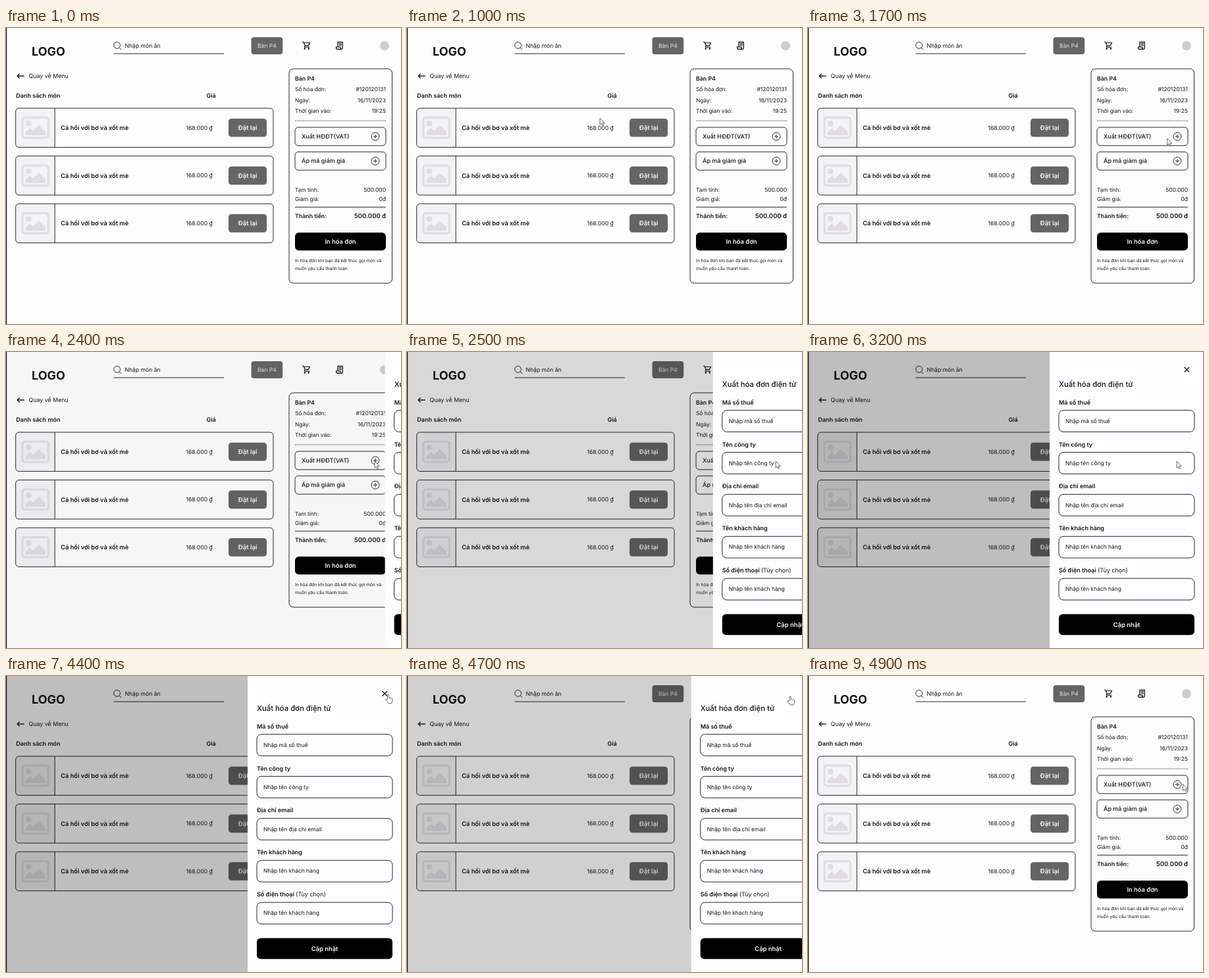
An HTML page for the animation above (5000 ms loop, 600 px wide and 450 px high).

```html
<!DOCTYPE html>
<html lang="vi">
<head>
<meta charset="utf-8">
<style>
  html, body { margin: 0; width: 100%; height: 100%; overflow: hidden; background: #fefdfe; }
  svg { display: block; width: 600px; height: 450px; }
  text { font-family: Inter, Roboto, sans-serif; fill: #141414; text-rendering: geometricPrecision; white-space: pre; }
  .line { fill: none; stroke: #1c1c1c; stroke-width: .95; }
  .bold { stroke-width: 1.35; }
</style>
</head>
<body>
<svg viewBox="0 0 600 450">
  <rect width="600" height="450" fill="#fefdfe"/>
  <g id="page"></g>
  <rect id="shade" width="600" height="450"/>
  <g id="drawer"></g>
  <rect width="1.2" height="450" fill="#111"/>
  <g id="cursor" fill="#fff" stroke="#444" stroke-width=".8" stroke-linejoin="round">
    <path id="arrow" d="M0 0V10.2L2.4 8 4 11.6 5.6 10.9 4.1 7.4H7.2Z"/>
    <path id="hand" d="M3 7.5V1.4a1.1 1.1 0 0 1 2.2 0V5l4.2.9a1.5 1.5 0 0 1 1.2 1.6l-.5 3.6-1 2.4H4.3L1.1 9.4 0 7.6q.8-1 1.8-.2Z"/>
  </g>
</svg>
<script>
const $ = id => document.getElementById(id);

// Markup helpers
const text = (x, y, str, size, weight = 400, anchor = 'start', fill = '#141414') =>
  `<text x="${x}" y="${y}" font-size="${size}" font-weight="${weight}" text-anchor="${anchor}" style="fill:${fill}">${str}</text>`;
const line = (d, cls = '') => `<path class="line ${cls}" d="${d}"/>`;
const frame = (x, y, w, h, r) => `<rect class="line" x="${x}" y="${y}" width="${w}" height="${h}" rx="${r}"/>`;
const button = (x, y, w, h, r, fill, label, size, weight, color = '#fafafa') =>
  `<rect x="${x}" y="${y}" width="${w}" height="${h}" rx="${r}" fill="${fill}"/>` +
  text(x + w / 2, y + h / 2 + size * .36, label, size, weight, 'middle', color);
const pair = (y, left, right) => text(439, y, left, 8.35) + text(577, y, right, 8.5, 400, 'end');

const header = () =>
  text(39, 41.5, 'LOGO', 18, 700) +
  '<circle class="line" cx="168.6" cy="26.3" r="4.9"/>' + line('M172.2 30l3 3M163.5 39H331') +
  text(180.5, 30, 'Nhập món ăn', 8.6) +
  button(372.5, 14, 47.7, 26, 4, '#666566', 'Bàn P4', 8.5, 400, '#e6e6e6') +
  `<path transform="translate(449.6 19.5) scale(.6)" fill="#141414" d="M15.55 13c.75 0 1.41-.41 1.75-1.03l3.58-6.49A1 1 0 0 0 20 4H5.2l-.94-2H1v2h2l3.6 7.6-1.35 2.43C4.5 15.4 5.5 17 7 17h12v-2H7l1.1-2zM6.16 6h12.15l-2.76 5H8.53z"/>
   <circle cx="453.8" cy="31.5" r="1.2"/><circle cx="459.8" cy="31.5" r="1.2"/>` +
  line('M504 28.6V21.5h7.3v9a1.7 1.7 0 0 1-1.7 1.7h-6.3a1.7 1.7 0 0 1-1.7-1.7v-1.6h6.4v1.6a1.7 1.7 0 0 0 1.6 1.7M505.7 24h4M505.7 26.3h4', 'bold') +
  '<circle cx="575" cy="27" r="7" fill="#cfcdd0"/>' +
  line('M27.8 73H17.2M20.6 69.6 17.2 73l3.4 3.4', 'bold') +
  text(34.5, 76.3, 'Quay về Menu', 8.85) +
  text(15.3, 105.5, 'Danh sách món', 9, 600) + text(304.5, 105.5, 'Giá', 9, 600);

const dish = y => `<g transform="translate(0 ${y})">
  <path d="M74 0H19.7a5 5 0 0 0-5 5V54.4a5 5 0 0 0 5 5H74Z" fill="#f3f2f4"/>
  <rect x="25" y="14.3" width="39.2" height="30.6" rx="3" fill="none" stroke="#dfdde0" stroke-width="3"/>
  <circle cx="34.2" cy="23.2" r="4.4" fill="#dfdde0"/>
  <path d="M29.5 41V36.5L36.5 30l4.5 4.5 8.5-9L60 35.5V41Z" fill="#dfdde0"/>` +
  frame(14.7, 0, 391.3, 59.4, 5) + line('M74.2 0V59.4') +
  text(83.2, 33.2, 'Cá hồi với bơ và xốt mè', 9.25, 600) +
  text(273.5, 32.8, '168.000 ₫', 8.65) +
  button(338, 15.8, 58, 27.8, 4.5, '#666566', 'Đặt lại', 9.6, 600) + '</g>';

const option = (y, label) => frame(439, y, 138, 27.8, 5) + text(449, y + 17, label, 9, 500) +
  `<circle class="line" cx="561" cy="${y + 13.9}" r="6"/>` + line(`M558 ${y + 13.9}h6m-3-3v6`);

const bill = () =>
  frame(430, 62, 156.5, 326, 6.5) +
  text(439, 80, 'Bàn P4', 8.8, 600) +
  pair(96.3, 'Số hóa đơn:', '#120120131') + pair(112.6, 'Ngày:', '16/11/2023') + pair(129, 'Thời gian vào:', '19:25') +
  '<path class="line" stroke-dasharray="1.2 1.2" d="M439 141H577"/>' +
  option(151, 'Xuất HĐĐT(VAT)') + option(188.3, 'Áp mã giảm giá') +
  pair(248.5, 'Tạm tính:', '500.000') + pair(262.6, 'Giảm giá:', '0đ') +
  line('M439 272.3H577') +
  text(439, 289.3, 'Thành tiền:', 8.8, 600) + text(577, 289.3, '500.000 đ', 9.5, 600, 'end') +
  button(439, 311, 138, 27.2, 6, '#000', 'In hóa đơn', 9.35, 600) +
  text(439, 356, 'In hóa đơn khi bạn đã kết thúc gọi món và', 6.66) +
  text(439, 367.7, 'muốn yêu cầu thanh toán.', 6.66);

const field = ([label, hint], i) => `<g transform="translate(0 ${i * 63.9})">` +
  text(381, 79.7, label, 9, 600) + frame(381, 88.6, 206, 32.8, 7) + text(391, 107.8, hint, 8.45) + '</g>';

$('page').innerHTML = header() + [122, 194.6, 267.2].map(dish).join('') + bill();
$('drawer').innerHTML = '<rect x="367" width="233" height="450" fill="#fefdff"/>' +
  line('M571.5 23l7.6 7.6m0-7.6-7.6 7.6', 'bold') +
  text(381, 53, 'Xuất hóa đơn điện tử', 11.3, 500) +
  [['Mã số thuế', 'Nhập mã số thuế'],
   ['Tên công ty', 'Nhập tên công ty'],
   ['Địa chỉ email', 'Nhập tên địa chỉ email'],
   ['Tên khách hàng', 'Nhập tên khách hàng'],
   ['Số điện thoại <tspan font-weight="400">(Tùy chọn)</tspan>', 'Nhập tên khách hàng']].map(field).join('') +
  button(381, 398.5, 206, 31.8, 6, '#000', 'Cập nhật', 9.4, 600);

// Pointer path: time, x, y
const path = [
  [700, 6, 19], [800, 110, 85], [900, 205, 120], [1000, 293, 137], [1200, 442, 147],
  [1500, 525, 162], [1800, 556, 171], [2000, 560, 166], [3800, 560, 166],
  [4100, 571, 80], [4300, 580, 33], [4400, 576.5, 28], [4600, 576.5, 28],
  [4700, 578, 30.5], [4800, 576, 90], [4900, 569.5, 164]
];

const easeOut = (t, start, length) => {
  const x = Math.min(1, Math.max(0, (t - start) / length));
  return 1 - (1 - x) ** 2;
};

function pointer(t) {
  const i = path.findIndex(p => p[0] >= t);
  if (i < 1) return path[0].slice(1);
  const [t0, x0, y0] = path[i - 1], [t1, x1, y1] = path[i];
  const k = (t - t0) / (t1 - t0);
  return [x0 + (x1 - x0) * k, y0 + (y1 - y0) * k];
}

function draw(t) {
  const open = easeOut(t, 2382, 335) - easeOut(t, 4661, 260);
  $('shade').setAttribute('opacity', .25 * open);
  $('drawer').setAttribute('transform', `translate(${233 * (1 - open)} 0)`);
  const hand = t >= 4300 && t < 4800;
  $('hand').style.display = hand ? '' : 'none';
  $('arrow').style.display = hand ? 'none' : '';
  $('cursor').style.display = t < 700 ? 'none' : '';
  $('cursor').setAttribute('transform', `translate(${pointer(t)})`);
}

// The picture advances ten times a second
const began = performance.now();
function tick() {
  const t = (performance.now() - began) % 5000;
  draw(Math.floor(t / 100) * 100);
  requestAnimationFrame(tick);
}
tick();
</script>
</body>
</html>
```
